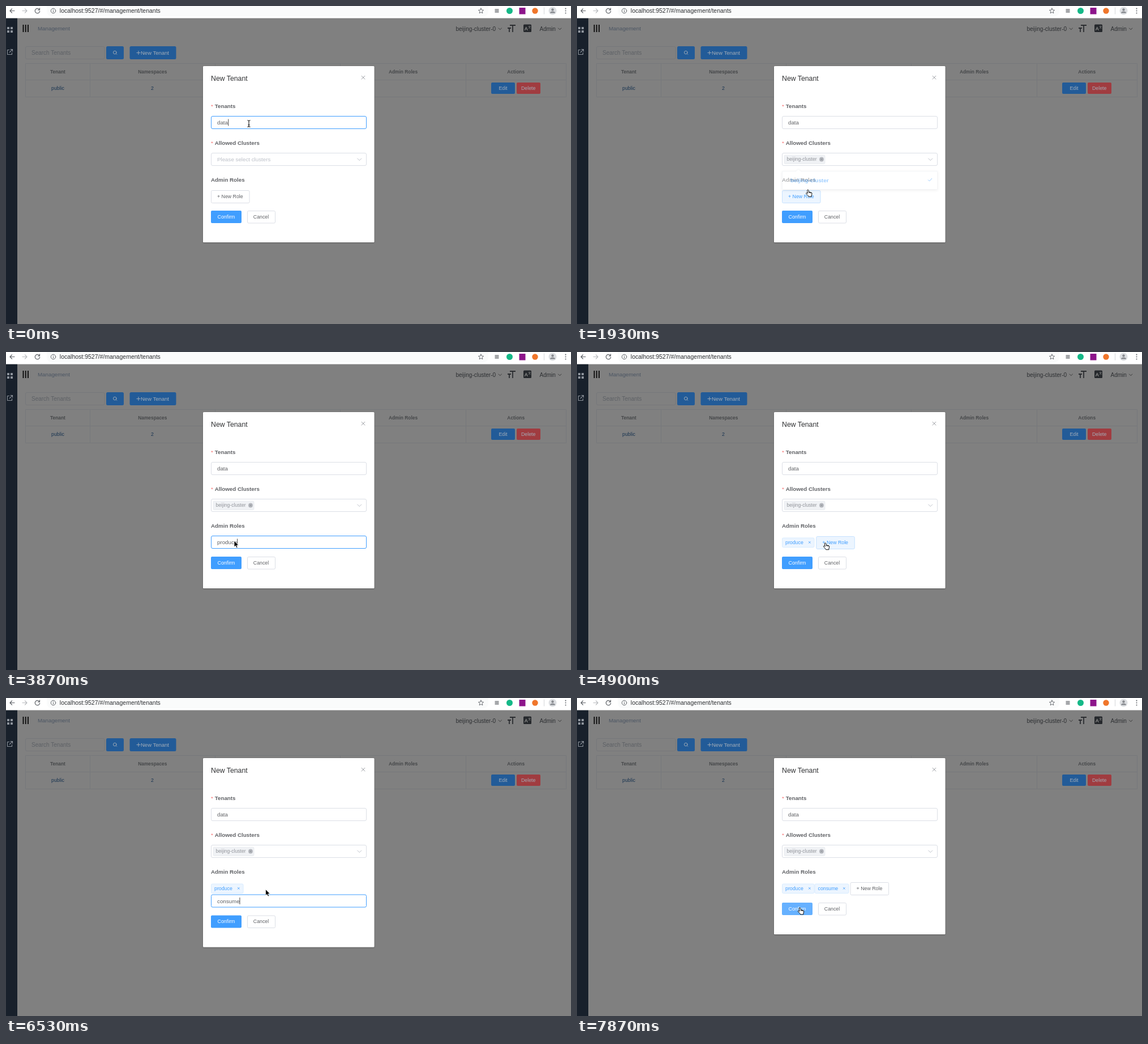
Animation of 998x561 px, one loop 8 s. Source, as an HTML page:

```html
<!DOCTYPE html>
<html lang="en">
<head>
<meta charset="utf-8">
<title>New Tenant</title>
<style>
html, body { margin: 0; width: 100%; height: 100%; overflow: hidden; background: #808080; }
svg { display: block; width: 998px; height: 561px; }
text { font: 9.75px "Liberation Sans", Arial, sans-serif; fill: #606266; white-space: pre; }
.small { font-size: 8.8px; }
.mid { text-anchor: middle; }
.bold { font-weight: bold; }
.head { font-size: 8.4px; font-weight: bold; text-anchor: middle; fill: #454749; }
.nav { font-size: 10px; fill: #2d2f32; }
.dim { fill: #a3adb8; }
.star { fill: #f56c6c; }
.white { fill: #fff; }
.blue { fill: #409eff; }
.hint { fill: #bcc0c8; }
.line { fill: none; stroke: #76787b; }
.box { fill: #fff; stroke: #dcdfe6; }
.focus { stroke: #409eff; }
.tag { fill: #ecf5ff; stroke: #d9ecff; }
.icon { fill: none; stroke: #5f6368; stroke-width: 1.2; stroke-linecap: round; stroke-linejoin: round; }
.chev { fill: none; stroke: #c0c4cc; stroke-linecap: round; }
.caret { stroke: #333; stroke-width: .9; }
.hover rect { fill: #ecf5ff; stroke: #c6e2ff; }
.hover text { fill: #409eff; }
#confirm.hover rect { fill: #66b1ff; stroke: none; }
#confirm.hover text { fill: #fff; }
.picked { fill: #409eff; font-weight: bold; }
</style>
</head>
<body>
<svg viewBox="0 0 998 561">
  <defs>
    <filter id="soft" x="-10%" y="-30%" width="120%" height="180%">
      <feDropShadow dx="0" dy="1.5" stdDeviation="2.5" flood-opacity=".13"/>
    </filter>
    <filter id="lift" x="-5%" y="-5%" width="110%" height="110%">
      <feDropShadow dx="0" dy=".7" stdDeviation="1" flood-opacity=".32"/>
    </filter>
  </defs>

  <!-- dimmed page -->
  <rect width="998" height="561" fill="#808080"/>
  <rect y="21" width="20" height="540" fill="#18202b"/>
  <g fill="#8b9199">
    <path d="M2 37h4v4H2zM8 37h4v4H8zM2 43h4v4H2zM8 43h4v4H8z"/>
    <path d="M6 77.500H2.500v8h8V82M7.500 76.500h4v4M11 77L6 82" fill="none" stroke="#8b9199" stroke-width="1.100"/>
  </g>
  <path d="M30.500 33v13M34.700 33v13M39 33v13" stroke="#080808" stroke-width="1.800"/>
  <text x="56" y="43" fill="#4b545f" style="fill:#4b5563">Management</text>
  <text class="nav" x="794.500" y="43.700">beijing-cluster-0</text>
  <text class="nav" x="942.500" y="43.700">Admin</text>
  <path d="M870 39l2.700 2.700 2.700-2.700M975.500 39l2.700 2.700 2.700-2.700" class="icon" style="stroke:#333;stroke-width:.9"/>
  <path d="M890 34h10M895 34v12M886 39h6M889 39v7" stroke="#2b2d30" stroke-width="1.800"/>
  <rect x="914" y="32.500" width="14" height="13.500" rx="1.500" fill="#25282c"/>
  <text x="915.500" y="43" class="bold" style="fill:#8a8a8a;font-size:9px">A</text>
  <path d="M922.500 36h4.500M924.700 35v1M926 36.500l-3 3.500M923.500 36.500l3 3.500" stroke="#8a8a8a" stroke-width=".7"/>

  <rect class="line" x="34.500" y="71.500" width="139.500" height="22" rx="2.500"/>
  <text x="45" y="86" style="fill:#5d6065;font-size:10px">Search Tenants</text>
  <g fill="#225b98">
    <rect x="177" y="71" width="31" height="23" rx="2.500"/>
    <rect x="218.500" y="71" width="82" height="23" rx="2.500"/>
    <rect x="857" y="135" width="42" height="20" rx="2"/>
    <rect x="902" y="135" width="42" height="20" rx="2" fill="#a03c40"/>
  </g>
  <circle cx="192.300" cy="82" r="2.800" class="icon" style="stroke:#a3adb8;stroke-width:.9"/>
  <path d="M194.500 84.200l1.500 1.500M230.500 82.500h7M234 79v7" stroke="#a3adb8" stroke-width=".9"/>
  <text x="238" y="86" class="dim" style="font-size:9.500px">New Tenant</text>

  <path class="line" d="M34.500 101.500H989.500V160.500H34.500zM34.500 130.500H989.500M148.500 101V160M369.500 101V160M590.500 101V160M812.500 101V160"/>
  <text class="head" x="91.500" y="118.500">Tenant</text>
  <text class="head" x="258.800" y="118.500">Namespaces</text>
  <text class="head" x="701.500" y="118.500">Admin Roles</text>
  <text class="head" x="900.700" y="118.500">Actions</text>
  <text class="small mid" x="91.500" y="147.500" style="fill:#173350">public</text>
  <text class="small mid" x="258.500" y="147.500" style="fill:#173350">2</text>
  <text class="small mid dim" x="878" y="148">Edit</text>
  <text class="small mid dim" x="922.700" y="148">Delete</text>

  <!-- browser bar -->
  <rect width="998" height="21.500" fill="#fff"/>
  <path d="M72 0H852v9a9.500 9.500 0 0 1-9.500 9.500H81.500A9.500 9.500 0 0 1 72 9z" fill="#fafbfb"/>
  <path class="icon" d="M15 8.500H7M10.500 5L7 8.500l3.500 3.500"/>
  <path class="icon" d="M29 8.500h8M33.500 5L37 8.500 33.500 12" style="stroke:#b9bbbe"/>
  <path class="icon" d="M58.800 6A4.200 4.200 0 1 0 59.700 9M59.500 3.800V6.800H56.500"/>
  <circle class="icon" cx="83.500" cy="8.500" r="4.200" style="stroke-width:1"/>
  <path d="M83.500 8v2.800M83.500 6v1" stroke="#5f6368" stroke-width="1.100"/>
  <text x="94.800" y="12.300" style="font-size:10.500px;fill:#2f3134">localhost:9527/#/management/tenants</text>
  <path class="icon" d="M839 4l1.300 3 3.300.3-2.500 2.200.8 3.200-2.900-1.700-2.900 1.700.8-3.200-2.500-2.200 3.300-.3z" style="stroke-width:.9"/>
  <rect x="863.500" y="5" width="7" height="7" fill="#a5a7aa"/>
  <circle cx="889.500" cy="8.500" r="5.500" fill="#15b887"/>
  <rect x="906.500" y="3" width="11" height="11.500" fill="#8d158b"/>
  <circle cx="934.500" cy="8.500" r="5.200" fill="#f0762b"/>
  <path d="M950.500 2.500v12" stroke="#d4d6d9"/>
  <circle cx="965.500" cy="8.500" r="7" fill="#dddfe2"/>
  <circle cx="965.500" cy="6.500" r="2.200" fill="#888b90"/>
  <path d="M961 12.500q0-3 4.500-3t4.500 3z" fill="#888b90"/>
  <path d="M988.500 4.600v.1M988.500 8.500v.1M988.500 12.400v.1" class="icon" style="stroke-width:2"/>

  <!-- dialog -->
  <rect id="dialog" x="348" y="106" width="302.500" height="311" rx="1.500" fill="#fff" filter="url(#lift)"/>
  <text x="362" y="132.300" style="font-size:12.300px;fill:#303133">New Tenant</text>
  <path d="M627.800 123l6.400 6.400M634.200 123l-6.400 6.400" stroke="#909399" stroke-width=".9"/>
  <text class="star" x="362" y="180">*</text>
  <text class="bold" x="368.800" y="179.500">Tenants</text>
  <rect id="tenant" class="box" x="362.500" y="194.500" width="274" height="22" rx="2.500"/>
  <text x="373" y="209">data</text>
  <path id="tenantCaret" class="caret" d="M392.800 199.500v12"/>

  <text class="star" x="362" y="245">*</text>
  <text class="bold" x="368.800" y="244.500">Allowed Clusters</text>
  <rect id="select" class="box" x="362.500" y="259.500" width="274" height="22" rx="2.500"/>
  <text id="hint" class="hint" x="373" y="274">Please select clusters</text>
  <g id="cluster">
    <rect x="366" y="263" width="72" height="15.500" rx="2" fill="#f0f2f5" stroke="#e6e8ec" stroke-width=".7"/>
    <text x="370.500" y="273.300" style="font-size:8.600px;fill:#909399">beijing-cluster</text>
    <circle cx="432" cy="270.500" r="3.900" fill="#b4b7bd"/>
    <path d="M430.600 269.100l2.800 2.800M433.400 269.100l-2.800 2.800" stroke="#8b8e94" stroke-width=".8"/>
  </g>
  <path id="chev" class="chev" d="M620.800 269l3.500 3.500 3.500-3.500"/>

  <text class="bold" x="362" y="310">Admin Roles</text>
  <g id="tags"></g>
  <g id="newRole">
    <rect class="box" x=".5" y="325.500" width="67.500" height="22" rx="2"/>
    <text class="small" x="11" y="339.200">+ New Role</text>
  </g>
  <g id="roleInput">
    <rect class="box focus" x="362.500" y="324.500" width="274" height="22" rx="2.500"/>
    <text id="role" x="373" y="339.300"></text>
    <path id="roleCaret" class="caret" d="M.4 329.500v12"/>
  </g>
  <g id="buttons">
    <g id="confirm">
      <rect x="362" y="361" width="54" height="22" rx="2" class="blue"/>
      <text class="small mid white" x="389" y="374.800">Confirm</text>
    </g>
    <rect class="box" x="426.500" y="361.500" width="49" height="21.500" rx="2"/>
    <text class="small mid" x="450.500" y="374.800">Cancel</text>
  </g>

  <g id="menu">
    <path d="M362.500 291.500H387l4-4 4 4H636.500V323.500H362.500z" fill="#fff" stroke="#e4e7ed" stroke-width=".8" filter="url(#soft)"/>
    <rect id="option" x="363" y="295" width="273" height="24" fill="#f5f7fa"/>
    <text id="optionText" x="377" y="310.500" style="font-size:9.900px">beijing-cluster</text>
    <path id="check" d="M620 306.500l2.500 2.500 4.500-5" fill="none" stroke="#409eff"/>
  </g>

  <g id="cursor">
    <g id="beam" fill="none">
      <path id="beamPath" d="M-2.600-5.800Q0-5.800 0-4.200V4.200Q0 5.800-2.600 5.800M2.600-5.800Q0-5.800 0-4.200M2.600 5.800Q0 5.800 0 4.200M-1.500 2.200h3" stroke="#fff" stroke-width="2.200"/>
      <use href="#beamPath" style="display:none"/>
      <path d="M-2.600-5.800Q0-5.800 0-4.200V4.200Q0 5.800-2.600 5.800M2.600-5.800Q0-5.800 0-4.200M2.600 5.800Q0 5.800 0 4.200M-1.500 2.200h3" stroke="#111" stroke-width="1.100"/>
    </g>
    <path id="arrow" d="M0 0V11l2.500-2.300 1.700 3.800 1.900-.8-1.600-3.700h3.400z" fill="#000" stroke="#fff" stroke-width=".8"/>
    <path id="hand" d="M-1.200 1C-1-.3.800-.4 1.200 1L2 4l3.800.8c1.200.3 1.600 1 1.400 2.200L6.400 10v1.900H1.200C.5 10-1.500 8.500-3 6.700c-.7-1 .4-1.800 1.400-1.200L-.3 6.300zM2 4l.3 1.700M4 4.400l.2 1.500M5.700 4.800v1.400" fill="#fff" stroke="#000" stroke-width=".95" stroke-linejoin="round"/>
  </g>
</svg>

<script>
const LOOP = 8000;
const $ = id => document.getElementById(id);
const show = (id, on) => { $(id).style.display = on ? '' : 'none'; };

// [time, changes]: every change holds until it is replaced
const events = [
  [0, { cursor: 'beam', tenant: true, caret: true, menu: 0, tags: 0, role: '' }],
  [297, { cursor: 'arrow' }],
  [590, { cursor: 'hand' }],
  [737, { tenant: false, select: true, menu: .5 }],
  [883, { menu: 1 }],
  [1030, { option: true }],
  [1330, { picked: true }],
  [1775, { option: false, hover: 'newRole' }],
  [1923, { menu: .5, select: false }],
  [2072, { menu: 0, hover: '', editing: true }],
  [2220, { cursor: 'beam' }],
  [2520, { caret: false }],
  [2670, { caret: true, role: 'p' }],
  [2820, { role: 'pr' }],
  [2970, { role: 'pro' }],
  [3120, { role: 'prod' }],
  [3270, { role: 'produ' }],
  [3420, { role: 'produc' }],
  [3570, { role: 'produce' }],
  [3870, { cursor: 'arrow' }],
  [4164, { editing: false, tags: 1, role: '' }],
  [4606, { cursor: 'hand', hover: 'newRole' }],
  [5050, { editing: true, hover: '', cursor: 'arrow' }],
  [5500, { role: 'co' }],
  [5645, { role: 'con' }],
  [5790, { role: 'consu' }],
  [6080, { role: 'consum' }],
  [6230, { role: 'consume' }],
  [7130, { editing: false, tags: 2, role: '' }],
  [7574, { cursor: 'hand', hover: 'confirm' }]
];

// [first step, last step, steps, x, y]
const moves = [
  [150, 590, 4, 420, 268],
  [737, 1030, 3, 417.5, 303.8],
  [1480, 2220, 6, 403, 334.5],
  [3870, 3870, 1, 403, 333],
  [4164, 4459, 3, 420, 340],
  [4606, 4900, 3, 438.500, 336.800],
  [5050, 5200, 2, 460, 338],
  [6380, 6530, 2, 458.500, 337.500],
  [7130, 7870, 6, 393.500, 370]
];

function cursorAt(t) {
  let x = 429, y = 207.5;
  for (const [from, to, steps, toX, toY] of moves) {
    if (t < from) break;
    const step = to > from ? Math.floor((t - from) / (to - from) * (steps - 1) + 1e-6) + 1 : 1;
    const p = Math.min(1, step / steps);
    x += (toX - x) * p;
    y += (toY - y) * p;
  }
  return [x, y];
}

function tag(id, x, width, label) {
  const end = x + width;
  return `<g id="${id}"><rect class="tag" x="${x + .5}" y="328" width="${width - 1}" height="16.500" rx="2"/>
    <text class="small blue" x="${x + 6}" y="339.200">${label}</text>
    <path d="M${end - 10.500} 334l3.600 3.600m0-3.600l-3.600 3.600" stroke="#409eff" stroke-width=".8"/></g>`;
}
$('tags').innerHTML = tag('produce', 362, 57.5, 'produce') + tag('consume', 419.5, 61, 'consume');

function draw(t) {
  const s = {};
  for (const [at, change] of events) if (t >= at) Object.assign(s, change);

  $('tenant').classList.toggle('focus', !!s.tenant);
  show('tenantCaret', s.tenant);
  $('select').classList.toggle('focus', !!s.select);
  $('chev').setAttribute('transform', s.select ? 'rotate(180 624.300 270.700)' : '');
  show('hint', !s.picked);
  show('cluster', s.picked);
  $('menu').style.opacity = s.menu;
  show('option', s.option);
  $('optionText').classList.toggle('picked', !!s.picked);
  show('check', s.picked);

  const shift = s.editing && s.tags ? 22.5 : 0;
  show('produce', s.tags > 0);
  show('consume', s.tags > 1);
  show('newRole', !s.editing);
  $('newRole').setAttribute('transform', `translate(${362 + s.tags * 60.3} 0)`);
  show('roleInput', s.editing);
  $('roleInput').setAttribute('transform', `translate(0 ${shift})`);
  $('role').textContent = s.role;
  show('roleCaret', s.caret);
  const width = s.editing && s.role ? $('role').getComputedTextLength() : 0;
  $('roleCaret').setAttribute('transform', `translate(${373 + width} 0)`);
  $('buttons').setAttribute('transform', `translate(0 ${shift})`);
  $('dialog').setAttribute('height', 311 + shift);
  for (const id of ['newRole', 'confirm']) $(id).classList.toggle('hover', s.hover === id);

  for (const id of ['beam', 'arrow', 'hand']) show(id, s.cursor === id);
  $('cursor').setAttribute('transform', `translate(${cursorAt(t)})`);
}

function tick() {
  draw(performance.now() % LOOP);
  requestAnimationFrame(tick);
}
tick();
</script>
</body>
</html>
```
